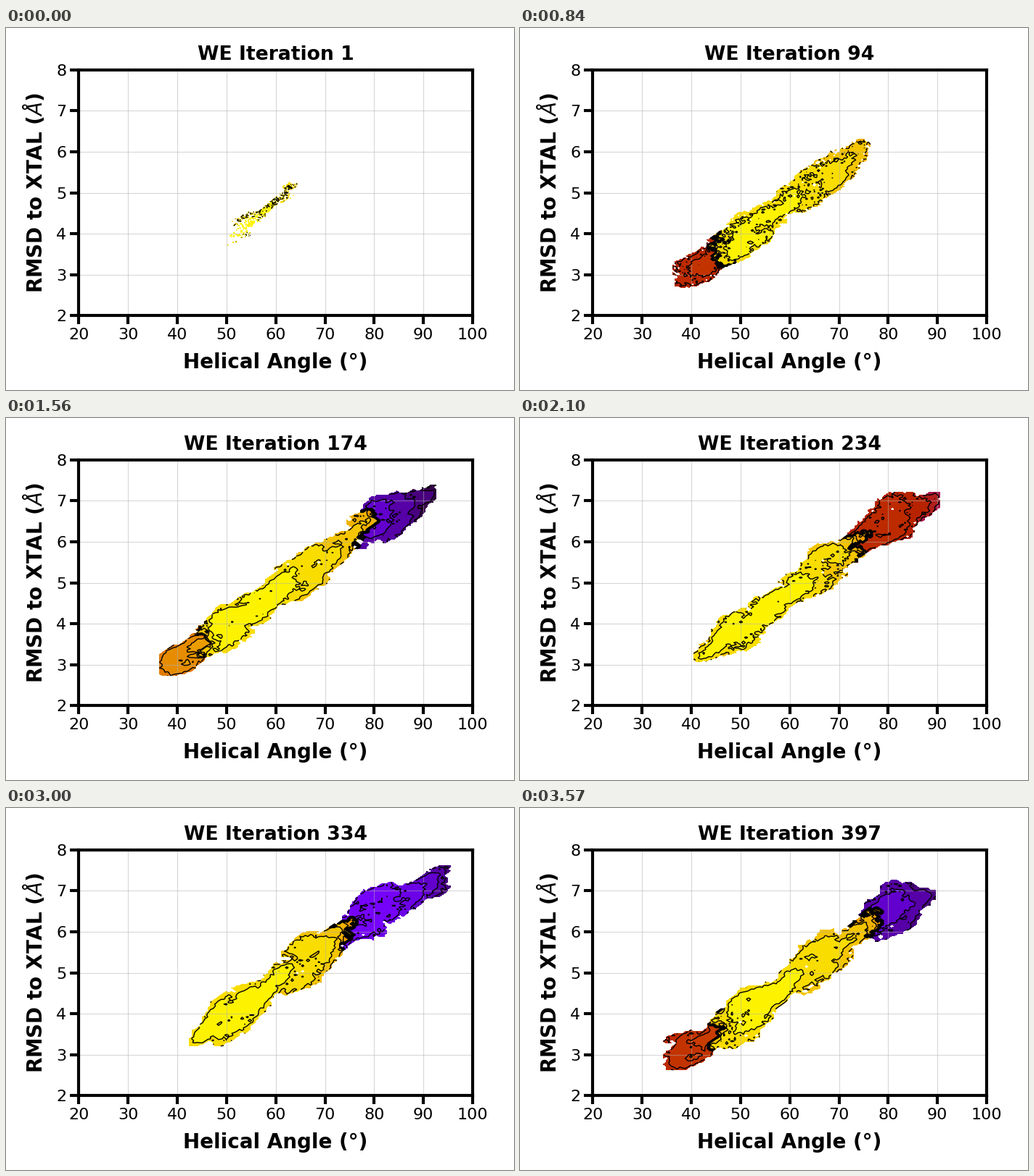
A matplotlib script for the animation above (3600 ms loop, 700 px wide and 500 px high).

```python
import numpy as np
import matplotlib.pyplot as plt
from matplotlib.animation import FuncAnimation

W, H, DPI = 700, 500, 100
FRAMES, INTERVAL = 120, 30
P_MAX = 30
LEVELS = np.arange(P_MAX + 1)
CORE = 52           # angle of the most populated state
LOW_EDGE = 47       # below this angle the rare low state begins
BASIN = 2 * np.pi / 15

# Key points: frame, lowest and highest angle, depth of the low state,
# depth of the high state, angle where the high state begins.
KEYS = np.array([
    (0, 50, 65, 0, 0, 80),
    (12, 35, 70, 16, 0, 80),
    (28, 37, 76, 12, 2, 79),
    (52, 37, 92, 4.5, 23, 78),
    (70, 41, 90, 0.5, 11, 73),
    (83, 37, 93, 1.5, 16, 72),
    (100, 43, 95, 0, 20.5, 73),
    (119, 35, 89, 11, 23, 75),
])


def ridge(x):
    """Path through the basins, flatter inside each of them."""
    line = np.interp(x, [34, 42, 80, 96], [3.05, 3.2, 6.5, 7.35])
    return line - 0.07 * np.sin(BASIN * (x - 66))


def half_width(x, lo, hi, i):
    size = np.interp(i, [0, 12], [0.33, 0.5])
    neck = np.interp(i, [0, 15, 119], [0.9, 0.15, 0.5])
    taper = np.clip(np.minimum(x - lo, hi - x) / 6, 0, 1) ** 0.5
    return size * taper * (1 + neck * np.cos(BASIN * (x - 66)))


def sample(i):
    """Weighted positions of all walkers in one iteration."""
    rng = np.random.default_rng(i + 7)
    lo, hi, low, high, high_edge = (
        np.interp(i, KEYS[:, 0], col) for col in KEYS[:, 1:].T)

    # walkers spread evenly along the path
    n = int(6 * (hi - lo))
    x = rng.uniform(lo + 1.2, hi - 1.2, n)
    v = rng.uniform(-1, 1, n)
    y = ridge(x) + 0.85 * v * half_width(x, lo, hi, i)
    seen = x + rng.normal(0, 1.2, n)
    depth = np.minimum(0.004 * (x - CORE) ** 2, 2) + 0.5 * v ** 2
    depth += low * (seen < LOW_EDGE) + high * (seen > high_edge)
    depth += 0.3 * np.maximum(x - 82, 0)

    # each leaves a small flat cloud of points
    per_walker = int(np.interp(i, [0, 10], [22, 70]))
    spot = np.interp(i, [0, 12], [0.55, 1])
    r = rng.random((per_walker, n)) ** 0.55
    a = rng.uniform(0, 2 * np.pi, (per_walker, n))
    px = x + 2.2 * spot * r * np.cos(a)
    py = y + spot * r * (0.09 * np.cos(a) + 0.13 * np.sin(a))
    weight = np.broadcast_to(np.exp(-depth), px.shape)
    return px.ravel(), py.ravel(), weight.ravel()


def free_energy(i):
    x, y, w = sample(i)
    total, ex, ey = np.histogram2d(x, y, bins=100, weights=w)
    count = np.histogram2d(x, y, bins=(ex, ey))[0]
    empty = count == 0
    # the root evens out the counting noise
    level = -np.log(np.where(empty, 1, total / np.sqrt(np.maximum(count, 1))))
    z = np.ma.array(level, mask=empty).T
    z = np.ma.minimum(z - z.min(), P_MAX - 0.05)
    return (ex[:-1] + ex[1:]) / 2, (ey[:-1] + ey[1:]) / 2, z


plt.rcParams["font.family"] = "DejaVu Sans"
fig = plt.figure(figsize=(W / DPI, H / DPI), dpi=DPI, facecolor="white")
ax = fig.add_axes([100.15 / W, 102.75 / H, 543 / W, 339.4 / H])
ax.set(xlim=(20, 100), ylim=(2, 8),
       xticks=range(20, 101, 10), yticks=range(2, 9))
ax.tick_params(length=8.5, width=3, pad=3.5, labelsize=16)
ax.grid(color="#b0b0b0", alpha=0.5, linewidth=0.8)
for spine in ax.spines.values():
    spine.set_linewidth(3)

label = dict(fontsize=20, fontweight="bold", ha="center", va="baseline")
fig.text(371 / W, 30 / H, "Helical Angle (°)", **label)
fig.text(50 / W, 272.5 / H, r"RMSD to XTAL ($\AA$)", rotation=90,
         rotation_mode="anchor", **label)
title = fig.text(371.5 / W, 456 / H, "", fontsize=19.2, fontweight="bold",
                 ha="center", va="baseline")

layers = []


def draw(i):
    while layers:
        layers.pop().remove()
    x, y, z = free_energy(i)
    layers.append(ax.contourf(x, y, z, levels=LEVELS, cmap="gnuplot_r",
                              vmin=0, vmax=P_MAX))
    layers.append(ax.contour(x, y, z, levels=LEVELS[1:], colors="black",
                             linewidths=1))
    title.set_text(f"WE Iteration {1 + 10 * i // 3}")
    return layers + [title]


anim = FuncAnimation(fig, draw, frames=FRAMES, interval=INTERVAL,
                     repeat=True, repeat_delay=0, blit=False)
plt.show()
```
